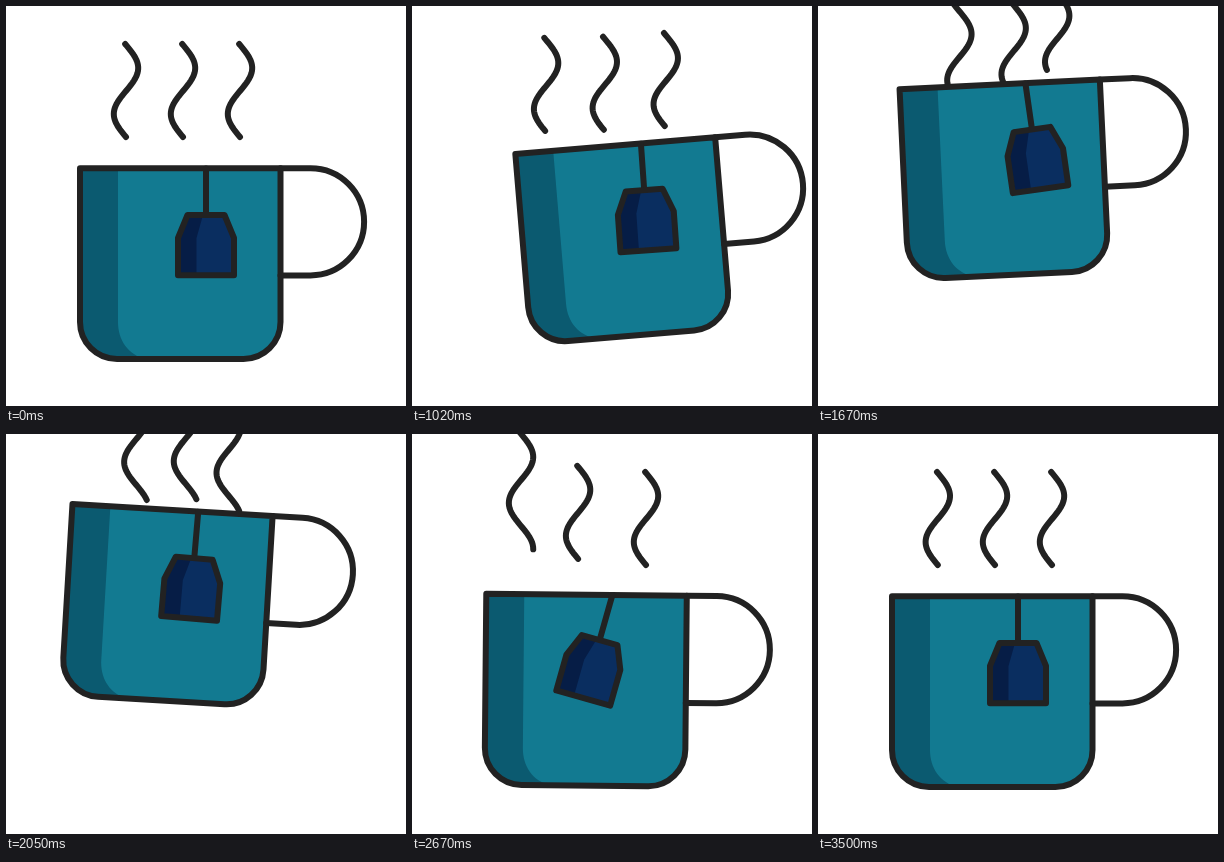
An HTML page with a canvas that plays this animation: 400x400 px, repeating every 3.7 s.

```html
<!DOCTYPE html>
<html lang="en">
<head>
<meta charset="utf-8">
<title>Tea cup</title>
<style>
  html, body { margin: 0; width: 100%; height: 100%; overflow: hidden; background: #fff; }
  canvas { display: block; width: 100vmin; height: 100vmin; }
</style>
</head>
<body>
<canvas id="stage" width="400" height="400"></canvas>
<script>
const ctx = document.getElementById('stage').getContext('2d');
const LOOP = 3700, LEAD = 495, STEP = 25, MOTION = 3000;
const INK = '#222222', TEAL = '#127a91', TEAL_DARK = '#0b5a70';
const NAVY = '#0a2e60', NAVY_DARK = '#061d46';
const CUP = { left: 74, right: 274.5, top: 162.2, bottom: 353, radius: 37 };
const CENTER = { x: 174.5, y: 258 };
const PIVOT = { x: 200, y: 162.5 };
const WAVE = { length: 92, amplitude: 12.2, top: 38, bottom: 131 };

// Key poses: time, x, y, degrees
const cupPoses = [
  [0, 0, 0, 0], [225, 10, 0, -0.7], [525, 37, -23, -4.8], [825, 39, -51, -8.9],
  [1075, 20, -77, -4.5], [1550, -13.4, -86.3, 3.4], [1950, -9, -26.4, 7.05],
  [2225, 0, 0, 0]
];

// Key swings: time, degrees relative to the cup
const bagSwings = [
  [0, 0], [225, 3.7], [825, -4], [1550, 1.5], [1950, 26], [2475, -6.3], [MOTION, 0]
];

// Each wisp rises by `lift` and settles after `rise` ms; its sideways drift ends after `drift` ms
const wisps = [
  { x: 120, lift: 65, rise: 2450, drift: 3060, stretch: 26 },
  { x: 177, lift: 67, rise: 2330, drift: 2750, stretch: 0 },
  { x: 234, lift: 70, rise: 2050, drift: 2150, stretch: 0 }
];

const clamp = (v, min, max) => Math.min(max, Math.max(min, v));

// A smooth rise and fall from 0 to 1 to 0; the power skews the peak
const hump = (u, power) => Math.sin(Math.PI * clamp(u, 0, 1) ** power) ** 2;

// Smooth curve through key points, at rest at both ends
function spline(keys, time, col) {
  const last = keys.length - 1;
  const t = clamp(time, 0, keys[last][0]);
  const span = n => keys[n + 1][0] - keys[n][0];
  const slope = n => (keys[n + 1][col] - keys[n][col]) / span(n);
  const tangent = n => n === 0 || n === last ? 0 :
    (slope(n) * span(n - 1) + slope(n - 1) * span(n)) / (span(n) + span(n - 1));
  let i = 0;
  while (i < last - 1 && t >= keys[i + 1][0]) i++;
  const u = (t - keys[i][0]) / span(i);
  const ease = u * u * (3 - 2 * u);
  return keys[i][col] + slope(i) * span(i) * ease
    + span(i) * u * (1 - u) * ((1 - u) * tangent(i) - u * tangent(i + 1));
}

function trace(points, closed) {
  ctx.beginPath();
  points.forEach(([x, y]) => ctx.lineTo(x, y));
  if (closed) ctx.closePath();
}

function rotateAbout(point, degrees) {
  ctx.translate(point.x, point.y);
  ctx.rotate(degrees * Math.PI / 180);
  ctx.translate(-point.x, -point.y);
}

function bodyPath() {
  const { left, right, top, bottom, radius } = CUP;
  ctx.beginPath();
  ctx.moveTo(left, top);
  ctx.lineTo(right, top);
  ctx.arcTo(right, bottom, CENTER.x, bottom, radius);
  ctx.arcTo(left, bottom, left, CENTER.y, radius);
  ctx.closePath();
}

function drawCup() {
  const { left, right, top, bottom } = CUP;
  bodyPath();
  ctx.fillStyle = TEAL;
  ctx.fill();

  ctx.save();
  ctx.clip();
  ctx.beginPath();
  ctx.moveTo(left, top);
  ctx.lineTo(112, top);
  ctx.lineTo(112, 316);
  ctx.bezierCurveTo(112, 334, 122, 349, 140, bottom);
  ctx.lineTo(left, bottom);
  ctx.fillStyle = TEAL_DARK;
  ctx.fill();
  ctx.restore();

  bodyPath();
  ctx.stroke();
  const handle = 53.6;
  ctx.beginPath();
  ctx.moveTo(right, top);
  ctx.arc(304.5, top + handle, handle, -Math.PI / 2, Math.PI / 2);
  ctx.lineTo(right, top + 2 * handle);
  ctx.stroke();
}

function drawBag() {
  trace([[PIVOT.x, PIVOT.y], [PIVOT.x, 208]]);
  ctx.stroke();
  const shape = (topRight, right) =>
    [[181.5, 209], [topRight, 209], [right, 232], [right, 269.3], [172, 269.3], [172, 232]];
  trace(shape(218.5, 228), true);
  ctx.fillStyle = NAVY;
  ctx.fill();
  trace(shape(197, 190.5), true);
  ctx.fillStyle = NAVY_DARK;
  ctx.fill();
  trace(shape(218.5, 228), true);
  ctx.stroke();
}

function drawWisp({ x, lift, rise, drift, stretch }, t) {
  const q = Math.min(1, t / drift) ** 1.3;
  const cx = x + 24 * (1 - q * q) * Math.sin(2 * Math.PI * q);
  const raised = lift * hump(t / rise, 1.5);
  const bottom = WAVE.bottom - raised;
  const top = WAVE.top - raised - stretch * hump((t - 1950) / 1050, 0.6);

  // The curve sways between bulging right and bulging left
  const fade = Math.min(1, t / 225, (MOTION - t) / 400);
  const crest = top + 24 + 15 * fade * Math.sin(2 * Math.PI * (t - 125) / 820);
  const points = [];
  for (let i = 0; i <= 48; i++) {
    const y = top + (bottom - top) * i / 48;
    points.push([cx + WAVE.amplitude * Math.cos(2 * Math.PI * (y - crest) / WAVE.length), y]);
  }
  trace(points);
  ctx.stroke();
}

function draw(time) {
  const step = Math.floor((time % LOOP - LEAD) / STEP);
  const t = clamp(step * STEP, 0, MOTION);
  ctx.fillStyle = '#fff';
  ctx.fillRect(0, 0, 400, 400);
  ctx.strokeStyle = INK;
  ctx.lineWidth = 6;
  ctx.lineCap = ctx.lineJoin = 'round';

  wisps.forEach(wisp => drawWisp(wisp, t));
  ctx.save();
  ctx.translate(spline(cupPoses, t, 1), spline(cupPoses, t, 2));
  rotateAbout(CENTER, spline(cupPoses, t, 3));
  drawCup();
  rotateAbout(PIVOT, spline(bagSwings, t, 1));
  drawBag();
  ctx.restore();
}

const start = performance.now();
function tick() {
  draw(performance.now() - start);
  requestAnimationFrame(tick);
}
tick();
</script>
</body>
</html>
```
